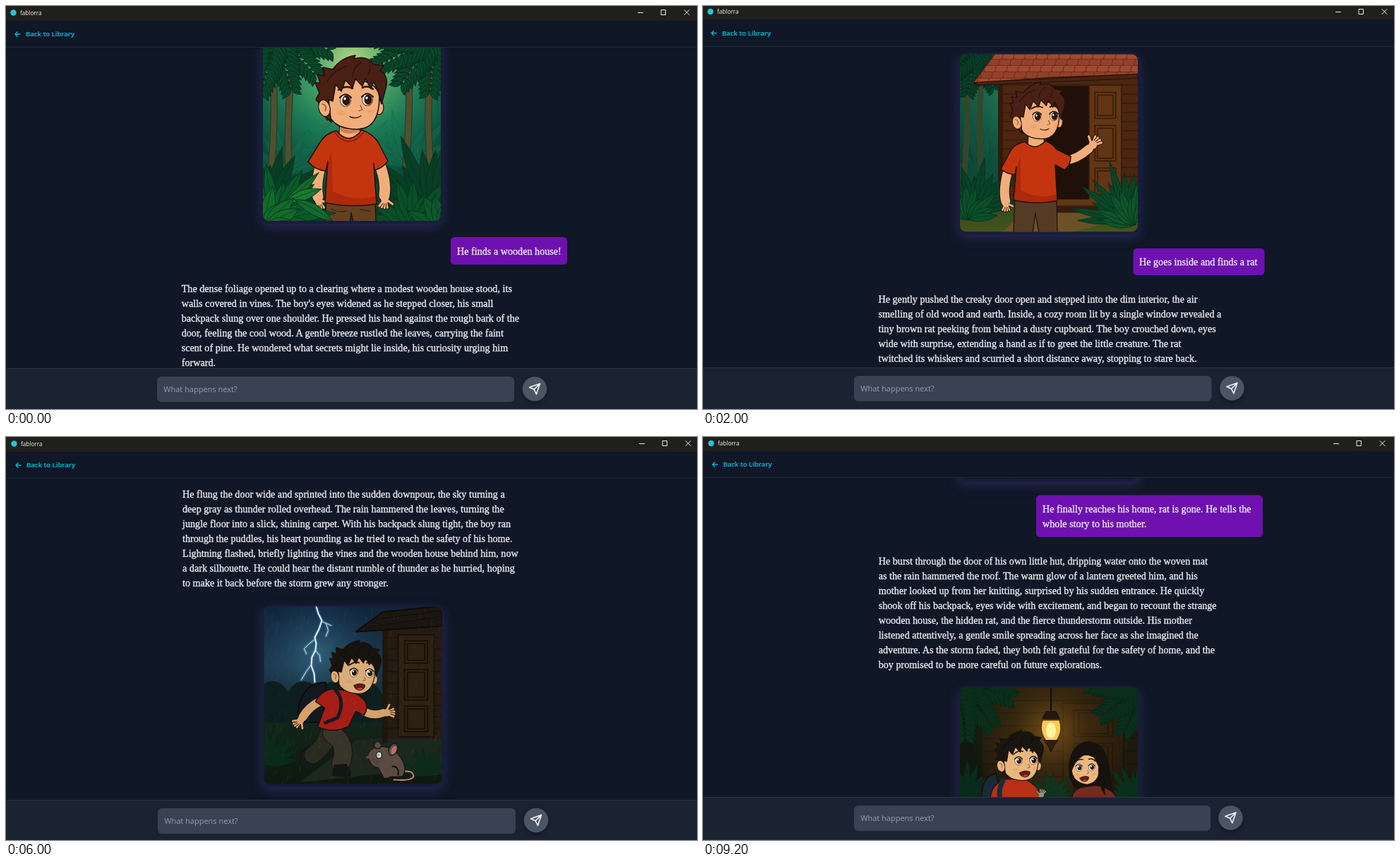
Write an HTML page with a canvas that moves like this. It is 979 px wide and 572 px high and loops after 10 s.

```html
<!DOCTYPE html>
<html lang="en">
<head>
<meta charset="utf-8">
<title>fablorra</title>
<style>
  html, body { margin: 0; width: 100%; height: 100%; overflow: hidden; background: #101726; }
  canvas { position: absolute; left: 0; top: 0; width: 979px; height: 572px; }
  .scene { position: absolute; left: 0; top: 0; width: 979px; height: 572px; overflow: hidden; display: none; }
  .feed { position: absolute; left: 0; width: 979px; overflow: hidden; }
  span { position: absolute; white-space: pre; line-height: 20px; }
  .story { font: 14.17px/20px "Liberation Serif", "Times New Roman", serif; color: #e8eaee; -webkit-text-stroke: .35px #e8eaee; }
  .app { font: 8.2px/20px "Open Sans", sans-serif; color: #f2f2f0; }
  .back { font: 600 9.55px/20px "Open Sans", sans-serif; color: #04bcd8; -webkit-text-stroke: .15px #04bcd8; }
  .hint { font: 11px/20px "Open Sans", sans-serif; color: #979faa; }
</style>
</head>
<body>
<canvas id="c"></canvas>
<script>
const W = 979, H = 572, HOLD = 2000, SIDE = 252, STEP = 21.05;
const canvas = document.getElementById('c'), g = canvas.getContext('2d');
const INK = '#1d100b', RED = '#c4350f', SKIN = '#f2ae7a';
const rad = d => d * Math.PI / 180;
let seed = 1;
const rnd = () => (seed = seed * 16807 % 2147483647) / 2147483647;

// ---- drawing helpers ----
function rect(x, y, w, h, col, r = 0) {
  g.fillStyle = col;
  g.beginPath();
  g.roundRect(x, y, w, h, r);
  g.fill();
}
function shape(fill, d, line, lw = 1.2) {
  const p = new Path2D(d);
  if (fill) { g.fillStyle = fill; g.fill(p); }
  if (line) { g.strokeStyle = line; g.lineWidth = lw; g.stroke(p); }
}
function oval(x, y, rx, ry, fill, line, turn = 0) {
  g.beginPath();
  g.ellipse(x, y, rx, ry, rad(turn), 0, 7);
  g.fillStyle = fill;
  g.fill();
  if (line) { g.strokeStyle = line; g.lineWidth = 1.2; g.stroke(); }
}
function limb(col, w, d) {
  shape(null, d, INK, w + 2);
  shape(null, d, col, w);
}
function fade(x0, y0, x1, y1, ...cols) {
  const f = g.createLinearGradient(x0, y0, x1, y1);
  cols.forEach((c, i) => f.addColorStop(i / (cols.length - 1), c));
  return f;
}
function glow(x, y, r, ...cols) {
  const f = g.createRadialGradient(x, y, 0, x, y, r);
  cols.forEach((c, i) => f.addColorStop(i / (cols.length - 1), c));
  g.fillStyle = f;
  g.fillRect(0, 0, SIDE, SIDE);
}
function at(x, y, s, fn, turn = 0) {
  g.save();
  g.translate(x, y);
  g.rotate(rad(turn));
  g.scale(s, s);
  fn();
  g.restore();
}
function leaf(x, y, a, len, w, col, rib = '#06301c') {
  at(x, y, 1, () => {
    shape(col, `M0 0Q${len * .45} ${-w} ${len} ${w * .4}Q${len * .45} ${w} 0 0Z`, rib, .8);
    shape(null, `M0 0Q${len * .45} ${-w * .1} ${len} ${w * .4}`, rib, .6);
  }, a);
}
function fan(x, y, n, len, a0, a1, w, col, rib) {
  for (let i = 0; i < n; i++) {
    leaf(x, y, a0 + (a1 - a0) * i / (n - 1), len * (.82 + .18 * Math.sin(i * 2.3)), w, col, rib);
  }
}
function frond(x, y, a, len, col) {
  at(x, y, 1, () => {
    for (let t = .05; t < 1; t += .09) {
      const l = len * .42 * (1.1 - t * .6);
      for (const side of [-1, 1]) leaf(len * t, len * .12 * t * t, side * 45, l, len * .1, col, '#06291a');
    }
  }, a);
}
function palm(x, y, angles, len, col) {
  angles.forEach(a => frond(x, y, a, len, col));
}
function planks(x, y, w, h, gap, col, line) {
  rect(x, y, w, h, col);
  for (let k = y + gap; k < y + h; k += gap) rect(x, k, w, 1, line);
}
function door(x, y, w, h, col, line) {
  rect(x, y, w, h, col);
  g.strokeStyle = line;
  g.lineWidth = 1.5;
  g.strokeRect(x, y, w, h);
  for (const [k, s] of [[.06, .22], [.34, .3], [.7, .25]]) {
    g.strokeRect(x + w * .18, y + h * k, w * .64, h * s);
    g.strokeRect(x + w * .26, y + h * k + 4, w * .48, h * s - 8);
  }
}

// ---- characters ----
function features(turn, scared, skin) {
  at(turn, 0, 1, () => {
    oval(-14, 11, 6, 3.5, 'rgba(235,110,70,.22)');
    oval(28, 9, 5, 3.5, 'rgba(235,110,70,.22)');
    for (const [x, y] of [[-8, -7], [23, -8]]) {
      oval(x, y, 7.5, 8.5, '#fdf3e6', '#6b4230');
      shape(null, `M${x - 8} ${y - 4}Q${x} ${y - 13} ${x + 8} ${y - 4}`, INK, 2);
      oval(x + 1, y, scared ? 4.8 : 5.6, scared ? 6 : 7.2, '#2b150d');
      oval(x - 1, y - 2.5, 1.6, 2, '#fff');
    }
    shape(null, scared ? 'M-18 -21Q-8 -30 1 -27M16 -28Q25 -31 32 -23' : 'M-18 -22Q-8 -29 2 -24M16 -25Q24 -29 31 -23', '#35150e', 2.6);
    shape(null, 'M13 0L16 6L11 8', '#8c4a2c', 1.3);
    if (scared) {
      shape('#6a1a14', 'M-6 18Q6 11 16 16Q16 26 5 27Q-4 26 -6 18Z', INK);
      shape('#c4493c', 'M0 25Q6 20 12 23Q6 28 0 25Z');
    } else shape(null, 'M-2 16Q7 20 14 15', '#4a1d12', 1.5);
  });
}
function head(x, y, s, { turn = 0, scared = false, skin = SKIN, hair = '#4a2014', tilt = 0 } = {}) {
  at(x, y, s, () => {
    oval(40, 3, 6, 10, skin, INK);
    shape(hair, 'M-34 22L-46 6Q-50 -30 0 -40L30 -30L38 0Z');
    shape(skin, 'M-37 -12C-37 22 -18 34 8 34C30 34 40 18 40 -12C38 -45 -36 -45 -37 -12Z', INK, 1.6);
    features(turn, scared, skin);
    shape(hair, 'M-28 24L-40 12L-46 -4L-50 -8L-45 -18L-51 -32L-44 -32L-48 -44L-38 -42L-40 -54L-26 -51Q-14 -68 6 -71L4 -66Q22 -72 32 -58L46 -56L41 -49Q54 -42 49 -24L43 -2L39 -18L32 -34L28 -24L20 -38L16 -27L6 -38L2 -25L-8 -36L-14 -20L-22 -30L-26 -6L-32 -8L-30 10Z', INK, 1.6);
    shape(null, 'M-34 -34Q-24 -50 -6 -56M2 -42Q4 -55 14 -61M24 -43Q28 -50 26 -56', 'rgba(10,4,3,.45)', 1.5);
    oval(-38, 4, 8, 12, skin, INK, -15);
    shape(null, 'M-41 -2Q-33 0 -37 8', '#a5562f', 1.5);
  }, tilt);
}
function hand(x, y, turn, s, skin = SKIN) {
  at(x, y, s, () => {
    for (const a of [-60, -22, -5, 12, 29]) at(0, 0, 1, () => limb(skin, 3.4, 'M4 0L15 0'), a);
    oval(2, 0, 6.5, 6, skin);
  }, turn);
}
function rat(x, y, fur) {
  at(x, y, 1, () => {
    shape(null, 'M20 16Q37 12 38 22Q36 29 10 27', INK, 4);
    shape(null, 'M20 16Q37 12 38 22Q36 29 10 27', '#a98578', 2.2);
    shape(fur, 'M-27 -8Q-24 -18 -12 -20Q8 -22 20 -4Q30 12 22 22L-4 25L-12 10Q-24 8 -27 -8Z', INK);
    oval(-13, -22, 5, 5, fur, INK);
    oval(9, -16, 6, 9, fur, INK, 25);
    oval(10, -15, 3.5, 6, '#b87064', null, 25);
    oval(-11, -8, 3.8, 4.6, '#f6f1e7', INK);
    oval(-11.5, -8, 1.6, 2.4, '#78a8b8');
    oval(-27, -5, 2.3, 2, '#6a403b');
    shape(null, 'M-15 22L-7 23M4 23L14 23M8 8Q18 8 16 20', INK, 2);
    shape(null, 'M-21 -3L-10 2M-20 -1L-12 6', '#31231d', .6);
  });
}

// ---- illustrations ----
function jungle(...cols) {
  glow(126, 25, 210, ...cols);
  g.globalAlpha = .3;
  fan(35, 185, 9, 95, -165, -15, 11, cols[2], cols[3]);
  fan(205, 175, 9, 90, -165, -15, 11, cols[2], cols[3]);
  fan(125, 175, 9, 85, -160, -20, 10, cols[2], cols[3]);
  g.globalAlpha = 1;
}
function forest() {
  jungle('#b4d680', '#4fa76a', '#1c7a55', '#0c5440', '#083c2c');
  for (const d of ['M14 35Q19 110 10 200', 'M44 20Q34 80 36 170', 'M206 20Q210 90 202 180', 'M238 40Q230 110 240 200']) {
    shape(null, d, '#26391f', 10);
    shape(null, d, '#514f30', 8);
  }
  palm(14, -14, [10, 38, 66, 95], 84, '#0b4a2b');
  palm(238, -14, [85, 114, 142, 170], 84, '#0b4a2b');
  fan(12, 235, 11, 96, -125, 10, 17, '#083f26');
  fan(240, 238, 12, 116, -190, -55, 18, '#083f26');
  fan(215, 262, 9, 78, -170, -25, 17, '#0a4f29');
  limb(SKIN, 15, 'M82 173Q74 200 78 218');
  limb(SKIN, 15, 'M166 173Q175 198 172 216');
  hand(79, 222, 78, .9);
  hand(173, 220, 98, .9);
  shape('#65401f', 'M90 220L88 254L123 254L125 240L128 254L160 254L159 222Z', INK);
  shape(null, 'M97 235Q108 241 118 238M138 236L152 238', '#3b2210', 1.4);
  shape(SKIN, 'M109 112L108 130Q122 144 138 129L137 112Z', INK);
  shape('#cb7f50', 'M110 117Q122 128 137 119L137 124Q122 132 110 124Z');
  shape(RED, 'M104 124Q88 128 80 142L64 168Q74 180 89 181L92 168L88 226Q124 234 161 228L157 171L158 180Q170 177 177 167L163 140Q155 128 140 123Q122 146 104 124Z', INK, 1.5);
  shape(null, 'M102 127Q122 152 143 126', '#7e1c0a', 1.4);
  shape('rgba(120,20,5,.3)', 'M92 170L97 153L99 210Q130 226 160 217L161 228Q124 234 88 226Z');
  head(125, 88, 1);
  fan(20, 250, 8, 84, -125, 8, 17, '#0b5a29');
  leaf(25, 240, -50, 78, 13, '#146a2c');
  leaf(34, 226, -28, 52, 15, '#1a7a2e');
  leaf(45, 222, 24, 62, 15, '#146a2c');
  fan(4, 262, 7, 62, -105, -5, 20, '#126a2a');
  fan(255, 264, 7, 58, -175, -80, 18, '#0d5829');
}
function porch() {
  jungle('#3c8a62', '#2c7a58', '#176048', '#0b4635', '#083426');
  shape(null, 'M8 30Q14 90 6 170M32 20Q25 90 30 170', '#34462c', 8);
  palm(18, -6, [15, 55, 90, 125], 62, '#0a4029');
  rect(0, 202, SIDE, 50, fade(0, 202, 0, 252, '#28491c', '#46541b'));
  shape('#6b5226', 'M92 224L232 222L215 238L160 252L60 252Z');
  planks(54, 30, 198, 186, 13, '#4c2611', '#30170a');
  rect(54, 36, 7, 178, '#341a0c');
  rect(116, 45, 70, 166, '#211009');
  rect(112, 42, 5, 170, '#5c2e12');
  door(183, 44, 46, 168, '#623514', '#341a0b');
  rect(108, 206, 144, 9, '#5f3719');
  rect(116, 215, 120, 10, '#371b0d');
  const eaves = 'M20 40L50 0L252 0L252 28L130 32Z';
  shape('#84331f', eaves, '#401910', 2);
  g.save();
  g.clip(new Path2D(eaves));
  for (let r = 0; r < 5; r++) {
    const y = r * 9 - 2;
    for (let x = 14 - r * 5; x < 252; x += 16) shape(r % 2 ? '#93402a' : '#a04a2f', `M${x} ${y}L${x + 16} ${y}L${x + 14} ${y + 8}Q${x + 6} ${y + 12} ${x - 2} ${y + 8}Z`, '#6f2a1c', .8);
  }
  g.restore();
  shape('#4b2213', 'M20 40L252 28L252 34L24 44Z', INK);
  fan(24, 226, 12, 80, -165, -20, 13, '#08432a');
  fan(12, 235, 9, 55, -150, -15, 12, '#0c4f2a');
  fan(239, 234, 11, 88, -185, -62, 11, '#0a4728');
  fan(248, 242, 8, 62, -178, -75, 13, '#10542b');
  limb(SKIN, 13, 'M69 162Q60 192 65 209');
  hand(65, 211, 85, .75);
  limb(SKIN, 12, 'M149 151Q166 149 183 134');
  hand(187, 130, -48, .95);
  shape('#553a25', 'M78 202L76 254L103 254L107 225L112 254L138 254L137 204Z', INK);
  shape(SKIN, 'M97 112L96 130Q109 139 120 128L118 112Z', INK);
  shape(RED, 'M92 124Q76 127 70 140L58 163Q66 170 78 171L80 160L76 207Q106 214 138 208L135 157L148 164Q157 158 157 145L137 135Q130 126 121 123Q106 139 92 124Z', INK, 1.5);
  shape('rgba(115,15,5,.3)', 'M80 160L86 145L86 193Q112 207 137 199L138 208Q106 214 76 207Z');
  head(110, 94, .77, { turn: 7 });
}
function room() {
  planks(0, 0, SIDE, 205, 19, '#4a260f', '#2d160a');
  glow(55, 70, 210, 'rgba(140,90,35,.35)', 'rgba(25,10,4,.4)');
  rect(0, 0, SIDE, 13, '#321909');
  rect(0, 10, 67, 92, '#6b3c16');
  rect(0, 17, 55, 78, fade(0, 18, 55, 95, '#5cae80', '#a7d3a0', '#4c9c74'));
  rect(0, 53, 57, 6, '#5b3214');
  rect(14, 17, 5, 80, '#5b3214');
  rect(50, 10, 7, 92, '#4a260f');
  rect(0, 95, 72, 8, '#845020');
  rect(162, 0, 18, 200, '#633613');
  rect(178, 0, 4, 202, '#281207');
  door(187, 2, 52, 192, '#6e3f17', '#3e210c');
  rect(0, 202, SIDE, 50, fade(0, 202, 0, 252, '#714513', '#8f5a1f'));
  for (let y = 210; y < 252; y += 12) rect(0, y, SIDE, 1, '#51300f');
  oval(88, 234, 65, 7, 'rgba(35,16,4,.5)');
  shape('#172c1d', 'M37 207Q28 225 34 235L48 237L53 212Z', INK);
  limb('#413018', 28, 'M48 184Q56 208 82 209');
  limb('#544222', 29, 'M54 184Q94 198 125 180Q122 196 110 211');
  shape('#17311f', 'M99 215L116 215Q131 222 132 233L99 235Z', INK);
  shape('#a71e13', 'M105 118Q127 130 139 148L118 158Z', INK);
  limb('#e9bf83', 12, 'M119 147L151 137');
  hand(155, 138, -28, .85, '#e9bf83');
  shape('#d53b17', 'M90 104Q72 110 53 132Q36 150 30 176Q60 187 95 181L102 163L120 158Q114 130 105 116Z', INK, 1.5);
  shape('rgba(120,15,7,.55)', 'M72 174Q95 150 100 139L102 164L95 181Z');
  limb('#f0ca8d', 14, 'M111 154Q138 164 160 151');
  hand(164, 148, -5, .98, '#f0ca8d');
  head(114, 85, .85, { turn: 8, scared: true, skin: '#f1cd94', hair: '#30210f', tilt: 6 });
  rat(174, 219, '#78614e');
}
function storm() {
  rect(0, 0, SIDE, SIDE, fade(0, 0, 0, 252, '#10243a', '#1b394d', '#12231f', '#0e1810'));
  glow(75, 65, 95, 'rgba(80,145,180,.45)', 'rgba(20,60,95,0)');
  for (let x = -10; x < 180; x += 22) oval(x, 145 + Math.sin(x) * 17, 25, 30, '#0c1f1e');
  rect(0, 165, SIDE, 87, fade(0, 165, 0, 252, '#12251a', '#0e180f'));
  shape('#1c271e', 'M130 190L252 180L252 228L50 250Z');
  planks(168, 28, 84, 160, 16, '#271b11', '#17100b');
  door(190, 40, 51, 145, '#2e2012', '#150d08');
  rect(168, 34, 7, 160, '#1e150d');
  shape('#1c1611', 'M130 36L168 8L252 -1L252 28Z', '#0d0b0a', 2);
  shape(null, 'M145 30L252 14M160 18L252 6', '#100d0b', 1.2);
  const trunk = 'M74 0L77 10L82 20L78 32L72 44L74 53L73 62L68 72L67 84L71 95L72 107';
  const twigs = 'M81 21L88 24L95 27M88 24L91 34L88 42M73 46L64 53L57 60L60 67M67 83L60 92L53 104M73 62L79 70L80 78';
  shape(null, trunk + twigs, 'rgba(110,175,230,.28)', 4.5);
  shape(null, trunk, '#eaf5fb', 1.9);
  shape(null, twigs, '#d3e8f4', 1);
  fan(5, 225, 9, 55, -145, -15, 9, '#0c291a');
  fan(230, 240, 10, 48, -170, -15, 7, '#11281a');
  shape('#111b1c', 'M53 207L65 198L73 219L66 234L52 226Z', INK);
  limb('#292b21', 23, 'M91 180Q86 200 69 211');
  limb('#373529', 25, 'M96 180Q119 194 109 224');
  shape('#111616', 'M100 225L116 224Q125 234 121 242L97 240Z', INK);
  shape('#14191f', 'M88 108Q63 107 53 130Q43 153 58 164L82 165Z', '#080b0f', 2);
  limb('#d6a06b', 12, 'M79 135Q64 142 55 157');
  hand(53, 161, 143, .82, '#d6a06b');
  limb('#d6a06b', 11, 'M138 147Q154 157 169 151');
  hand(172, 151, -4, .85, '#d6a06b');
  shape('#a51e15', 'M101 117Q82 117 73 135L86 144L76 171Q100 181 120 170L130 149L142 154Q149 143 143 134Q132 121 116 120Z', INK, 1.5);
  shape(null, 'M101 118Q116 135 104 158L87 165', '#161a20', 5);
  head(128, 99, .72, { turn: 6.4, scared: true, skin: '#d8ad78', hair: '#17130f', tilt: 4 });
  rat(174, 219, '#594b42');
  seed = 17;
  g.strokeStyle = 'rgba(150,190,210,.12)';
  g.lineWidth = .6;
  g.beginPath();
  for (let i = 0; i < 180; i++) {
    const x = rnd() * SIDE, y = rnd() * SIDE;
    g.moveTo(x, y);
    g.lineTo(x - 2, y + 8);
  }
  g.stroke();
}
function hut() {
  rect(0, 0, SIDE, SIDE, '#171d12');
  planks(32, 0, 220, SIDE, 18, '#29200f', '#17140c');
  door(146, 22, 86, 170, '#2f200e', '#1a1209');
  glow(129, 62, 115, 'rgba(200,135,35,.5)', 'rgba(90,58,18,.25)', 'rgba(5,9,6,.3)');
  palm(-5, -8, [10, 45, 75], 80, '#0c3019');
  palm(260, -8, [105, 135, 170], 76, '#0c3019');
  fan(10, 160, 9, 60, -140, -15, 9, '#0b2a1b');
  fan(130, 160, 9, 45, -155, -25, 7, '#12361e');
  fan(250, 160, 9, 60, -180, -55, 8, '#0c3019');
  shape(null, 'M129 0L129 39', '#0d0d09', 2);
  shape('#201a10', 'M116 46L122 34L136 34L142 46Z', INK);
  shape('#f9c955', 'M117 46L141 46Q147 62 137 76L122 76Q111 62 117 46Z', '#533713', 2);
  oval(129, 61, 7, 11, '#fff3a8');
  shape('#2b2111', 'M119 75L139 75L133 83L129 91L125 83Z', INK);
  shape('#172a37', 'M30 158Q31 126 51 122L61 160Z', INK, 2);
  shape('#b82e17', 'M66 130Q43 137 43 160L121 160Q108 137 94 131Z', INK);
  shape(null, 'M61 132Q53 146 58 160', '#192c37', 7);
  head(84, 109, .68, { turn: 6.5, scared: true, skin: '#e9b77e', hair: '#191510' });
  hand(115, 154, -75, .6, '#9a9182');
  shape('#15120f', 'M156 129Q150 85 178 77Q204 75 210 108L220 160L190 160L161 140Z', INK);
  shape('#702c1c', 'M171 142Q158 147 159 160L224 160Q217 143 193 139Z', INK);
  at(178, 118, .58, () => {
    shape('#eab880', 'M-34 -20Q-40 28 3 34Q38 29 35 -20Q2 -57 -34 -20Z', INK, 1.6);
    features(-8, true);
    shape('#15120f', 'M-38 10Q-51 -42 0 -66Q48 -58 42 5L48 60Q28 35 32 -10Q20 -38 8 -43Q-22 -33 -32 -4Z', INK);
  });
}

// ---- scenes: the whole window shifts slightly between them ----
const scenes = [
  { bar: 21, name: [20, 9.5], back: [28, 40], top: 58, foot: 514, box: [214, 526, 506], send: [749, 543.5], win: [899, 9],
    pics: [[forest, 364, 53]], bubbles: [[630, 328, 165, 39]],
    text: [[639, 347.5, 'He finds a wooden house!'],
      [248.7, 400.5, "The dense foliage opened up to a clearing where a modest wooden house stood, its|walls covered in vines. The boy's eyes widened as he stepped closer, his small|backpack slung over one shoulder. He pressed his hand against the rough bark of the|door, feeling the cool wood. A gentle breeze rustled the leaves, carrying the faint|scent of pine. He wondered what secrets might lie inside, his curiosity urging him|forward."]] },
  { bar: 19, name: [20, 8], back: [27, 38.5], top: 57, foot: 513, box: [214, 525, 506.5], send: [749.5, 542.5], win: [900, 8],
    pics: [[porch, 364, 68.5]], bubbles: [[609.5, 344, 186, 38]],
    text: [[618, 363, 'He goes inside and finds a rat'],
      [248.5, 415.5, 'He gently pushed the creaky door open and stepped into the dim interior, the air|smelling of old wood and earth. Inside, a cozy room lit by a single window revealed a|tiny brown rat peeking from behind a dusty cupboard. The boy crouched down, eyes|wide with surprise, extending a hand as if to greet the little creature. The rat|twitched its whiskers and scurried a short distance away, stopping to stare back.']] },
  { bar: 18, name: [19, 7.5], back: [26, 37.5], top: 56, foot: 512, box: [213, 524, 506], send: [748, 541], win: [898, 7], edge: true,
    pics: [[room, 363, 122]], bubbles: [[472, 396.5, 322, 80.5]],
    text: [[247.5, 67, 'twitched its whiskers and scurried a short distance away, stopping to stare back.|Both seemed curious, the boy feeling a sudden kinship with the shy animal.'],
      [480.5, 415.5, 'He quickly runs back outside, and finds it has started|raining. Now he is running towards his home, in|thunderstorms'],
      [247.5, 510.5, 'He flung the door wide and sprinted into the sudden downpour, the sky turning a']] },
  { bar: 21, name: [21, 9.5], back: [29, 40], top: 58, foot: 515, box: [215, 527, 507], send: [751, 544], win: [901, 9],
    pics: [[storm, 365.5, 240.5]], bubbles: [],
    text: [[250, 81, 'He flung the door wide and sprinted into the sudden downpour, the sky turning a|deep gray as thunder rolled overhead. The rain hammered the leaves, turning the|jungle floor into a slick, shining carpet. With his backpack slung tight, the boy ran|through the puddles, his heart pounding as he tried to reach the safety of his home.|Lightning flashed, briefly lighting the vines and the wooden house behind him, now|a dark silhouette. He could hear the distant rumble of thunder as he hurried, hoping|to make it back before the storm grew any stronger.']] },
  { bar: 20, name: [21, 9], back: [28.5, 39], top: 57, foot: 511, box: [214, 523, 505], send: [747.5, 540.5], win: [897, 9], edge: true,
    pics: [[storm, 364, -192.5], [hut, 364, 355.5]], bubbles: [[472, 82.5, 321, 59.5]],
    text: [[481, 102, 'He finally reaches his home, rat is gone. He tells the|whole story to his mother.'],
      [248.7, 175.5, 'He burst through the door of his own little hut, dripping water onto the woven mat|as the rain hammered the roof. The warm glow of a lantern greeted him, and his|mother looked up from her knitting, surprised by his sudden entrance. He quickly|shook off his backpack, eyes wide with excitement, and began to recount the strange|wooden house, the hidden rat, and the fierce thunderstorm outside. His mother|listened attentively, a gentle smile spreading across her face as she imagined the|adventure. As the storm faded, they both felt grateful for the safety of home, and the|boy promised to be more careful on future explorations.']] }
];

function put(parent, cls, x, y, str) {
  const el = document.createElement('span');
  el.className = cls;
  el.textContent = str;
  el.style.left = x + 'px';
  el.style.top = y - 10 + 'px';
  parent.append(el);
}
for (const s of scenes) {
  s.el = document.createElement('div');
  s.el.className = 'scene';
  const feed = document.createElement('div');
  feed.className = 'feed';
  feed.style.top = s.top + 1 + 'px';
  feed.style.height = s.foot - s.top - 1 + 'px';
  for (const [x, y, lines] of s.text) {
    lines.split('|').forEach((l, i) => put(feed, 'story', x, y + i * STEP - s.top - 1, l));
  }
  s.el.append(feed);
  put(s.el, 'app', ...s.name, 'fablorra');
  put(s.el, 'back', ...s.back, 'Back to Library');
  put(s.el, 'hint', s.box[0] + 9.3, s.box[1] + 18, 'What happens next?');
  document.body.append(s.el);
}

function picture([art, x, y]) {
  g.save();
  g.shadowColor = 'rgba(64,62,140,.4)';
  g.shadowBlur = 15 * ratio;
  g.shadowOffsetY = 6 * ratio;
  rect(x - 4, y - 2, SIDE + 8, SIDE + 6, '#191d3a', 14);
  g.restore();
  g.save();
  g.beginPath();
  g.roundRect(x, y, SIDE, SIDE, 9);
  g.clip();
  g.translate(x, y);
  art();
  g.restore();
}
function draw(s) {
  g.setTransform(ratio, 0, 0, ratio, 0, 0);
  g.lineJoin = g.lineCap = 'round';
  rect(0, 0, W, H, '#101726');
  g.save();
  g.beginPath();
  g.rect(0, s.top + 1, W, s.foot - s.top - 1);
  g.clip();
  s.pics.forEach(picture);
  s.bubbles.forEach(([x, y, w, h]) => rect(x, y, w, h, '#6e11b0', 5.5));
  g.restore();

  rect(0, 0, W, s.bar, '#201f1c');
  oval(s.name[0] - 9.5, s.name[1], 4.2, 4.2, '#24c8db');
  rect(0, s.top, W, 1, '#1c2b3b');
  const [wx, wy] = s.win;
  shape(null, `M${wx - 3.5} ${wy + .5}h7M${wx + 29.5} ${wy - 3.5}h6v7h-6ZM${wx + 62} ${wy - 3.5}l7 7m0 -7l-7 7`, '#eeeeec', 1);
  const [bx, by] = s.back;
  shape(null, `M${bx - 8} ${by}h-7m3.2 -3.3l-3.3 3.3l3.3 3.3`, '#04bcd8', 1.3);

  rect(0, s.foot, W, H - s.foot, '#1a2332');
  rect(0, s.foot, W, 1, '#263443');
  rect(s.box[0], s.box[1], s.box[2], 36, '#384253', 6);
  const [cx, cy] = s.send;
  g.save();
  g.shadowColor = 'rgba(0,0,0,.28)';
  g.shadowBlur = 6 * ratio;
  g.shadowOffsetY = 3 * ratio;
  oval(cx, cy, 17.3, 17.3, '#4b5563');
  g.restore();
  at(cx, cy, 1, () => shape(null, 'M7.5 -7.5L2.4 7.5L-.8 .8L-7.5 -2.3ZM7.5 -7.5L-.8 .8', '#f6f7f9', 1.6));
  if (s.edge) rect(0, 571, W, 1, '#2b2d31');
}

const ratio = window.devicePixelRatio || 1;
canvas.width = Math.round(W * ratio);
canvas.height = Math.round(H * ratio);
let shown = -1;
function tick() {
  const i = Math.floor(performance.now() / HOLD) % scenes.length;
  if (i !== shown) {
    scenes.forEach((s, k) => { s.el.style.display = k === i ? 'block' : 'none'; });
    draw(scenes[i]);
    shown = i;
  }
  requestAnimationFrame(tick);
}
tick();
</script>
</body>
</html>
```
